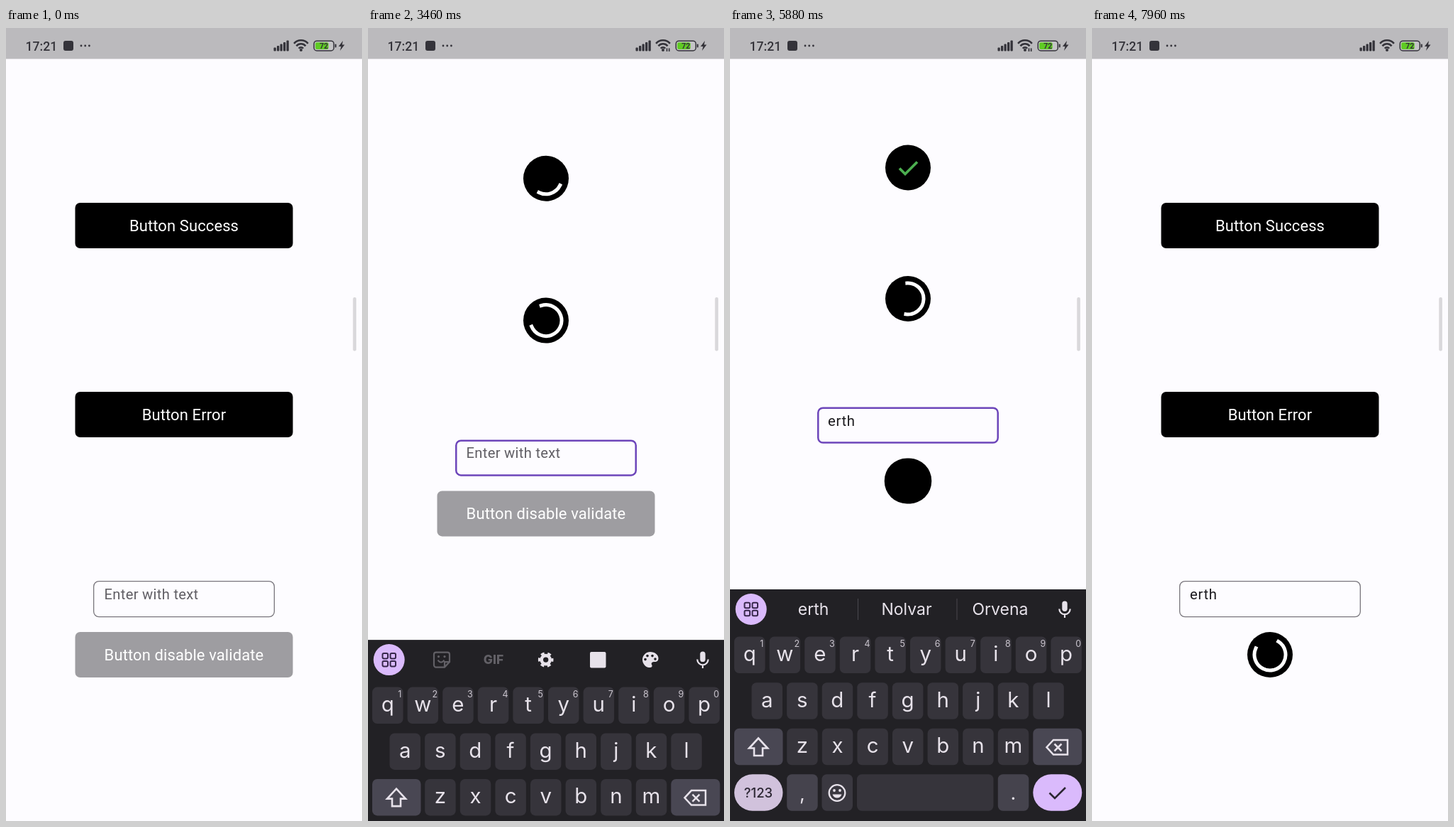
Recreate the animation shown at these times as an HTML page. Size 502x1116 px, loop 8 s.

```html
<!DOCTYPE html>
<html lang="en">
<head>
<meta charset="utf-8">
<title>Loading buttons</title>
<style>
  html, body { margin: 0; width: 100%; height: 100%; overflow: hidden; background: #fdfcff; }
  svg { display: block; width: 502px; height: 1116px; }
  text { font-family: Roboto, sans-serif; white-space: pre; }
  .key, .key text { font-family: Inter, Roboto, sans-serif; }
</style>
</head>
<body>
<svg id="stage" viewBox="0 0 502 1116"></svg>
<script>
const LOOP = 8000;
const STEP = 1000 / 24;
const KEYBOARD = 326;
const LIGHT = '#e7e2ea', DARK = '#222125', LILAC = '#dabafc', INK = '#34333a';
const stage = document.getElementById('stage');

function el(tag, attrs, parent = stage, content) {
  const node = document.createElementNS('http://www.w3.org/2000/svg', tag);
  set(node, attrs);
  if (content !== undefined) node.textContent = content;
  parent.appendChild(node);
  return node;
}
function set(node, attrs) {
  for (const name in attrs) node.setAttribute(name, attrs[name]);
}
const rect = (x, y, width, height, rx, fill, parent) =>
  el('rect', { x, y, width, height, rx, fill }, parent);
const circle = (cx, cy, r, fill, parent) => el('circle', { cx, cy, r, fill }, parent);
const line = (d, stroke, width, parent, cap = 'butt') =>
  el('path', { d, stroke, fill: 'none', 'stroke-width': width, 'stroke-linecap': cap }, parent);
const label = (x, y, size, fill, content, parent, anchor = 'middle', weight = 400) =>
  el('text', { x, y, fill, 'font-size': size, 'text-anchor': anchor, 'font-weight': weight }, parent, content);
const show = (node, on) => node.setAttribute('visibility', on ? 'inherit' : 'hidden');
const move = (node, y) => node.setAttribute('transform', `translate(0 ${y})`);

const clamp = x => Math.min(1, Math.max(0, x));
const progress = (t, start, length) => clamp((t - start) / length);
const easeOut = x => 1 - (1 - x) ** 3;
const easeInOut = x => x * x * (3 - 2 * x);

// cubic-bezier(.4, 0, .2, 1)
function standard(x) {
  x = clamp(x);
  let lo = 0, hi = 1;
  for (let i = 0; i < 24; i++) {
    const s = (lo + hi) / 2, r = 1 - s;
    if (1.2 * r * r * s + .6 * r * s * s + s ** 3 < x) lo = s; else hi = s;
  }
  return easeInOut(lo);
}

function arcPath(elapsed, radius) {
  const phase = elapsed / 1333 % 1;
  const head = standard(phase * 2) * 270;
  const tail = standard(phase * 2 - 1) * 270;
  const from = -90 + tail + phase * 90 + elapsed / 2222 * 360;
  const sweep = Math.max(head - tail, .1);
  const at = deg => {
    const a = deg * Math.PI / 180;
    return `${(radius * Math.cos(a)).toFixed(2)} ${(radius * Math.sin(a)).toFixed(2)}`;
  };
  return `M${at(from)}A${radius} ${radius} 0 ${sweep > 180 ? 1 : 0} 1 ${at(from + sweep)}`;
}

// Page: each button has a spinner start, a result time and a reopening time.
class Button {
  constructor(y, caption, times, mark) {
    Object.assign(this, { y, times });
    this.group = el('g', {});
    this.box = rect(0, -32, 0, 64, 7, '#000', this.group);
    this.caption = label(251, 7.7, 22, '#fff', caption, this.group);
    this.caption.setAttribute('letter-spacing', .1);
    const icon = el('g', { transform: 'translate(251 0)' }, this.group);
    this.arc = line('', '#fff', 5, icon, 'square');
    this.mark = mark && line(mark.d, mark.color, 3.7, icon);
  }
  draw(t, shift, color) {
    const { spin, done, open } = this.times;
    const shut = easeInOut(progress(t, spin - 250, 250)) - easeInOut(progress(t, open, 250));
    const width = 307 - 243 * shut;
    move(this.group, this.y - shift);
    set(this.box, { x: 251 - width / 2, width, rx: 7 + 25 * shut, fill: color });
    this.caption.setAttribute('opacity', clamp(1 - shut * 2.5));
    const spinning = t >= spin && t < done;
    show(this.arc, spinning);
    if (spinning) this.arc.setAttribute('d', arcPath(t - spin, 22));
    if (this.mark) show(this.mark, t >= done && t < open);
  }
}

const success = new Button(278, 'Button Success', { spin: 600, done: 5450, open: 6250 },
  { d: 'M-12 1L-4 9L13 -8', color: '#4caf50' });
const failure = new Button(544, 'Button Error', { spin: 1575, done: 6425, open: 7225 },
  { d: 'M-12.5 -11L12.5 14M12.5 -11L-12.5 14', color: '#f44336' });
const validate = new Button(882, 'Button disable validate', { spin: 5890, done: 1e5, open: 1e5 });

const field = el('g', {});
const frame = el('rect', { fill: 'none' }, field);
const hint = label(138.5, 804, 20.2, '#605e64', 'Enter with text', field, 'start');
hint.setAttribute('letter-spacing', .3);
const typed = label(138, 804, 20.4, '#1c1b1f', '', field, 'start');
typed.setAttribute('letter-spacing', .6);
const caret = rect(139, 780, 2.4, 31, 0, '#6750a4', field);

// The outline grows inwards when it gets thicker.
function outline(stroke, width) {
  set(frame, {
    x: 123 + width / 2, y: 778 + width / 2, width: 256 - width, height: 51.3 - width,
    rx: 8 - width / 2, stroke, 'stroke-width': width
  });
}

rect(489.3, 379, 4.6, 75.5, 2, '#d9d8db');

// Status bar
rect(0, 0, 502, 43.5, 0, '#bbbabd');
label(27.5, 31.5, 17.6, INK, '17:21', stage, 'start', 500);
rect(81, 18, 14, 14, 3, INK);
for (const x of [106, 111.7, 117.4]) circle(x, 25, 1.4, INK);
for (let i = 0; i < 5; i++) {
  const h = 5 + 2.5 * i;
  rect(377.5 + 4.5 * i, 32.5 - h, 3.3, h, 1, INK);
}
for (const r of [4.2, 8.6, 13]) {
  const d = r * .76;
  line(`M${416 - d} ${32 - r * .78}A${r} ${r} 0 0 1 ${416 + d} ${32 - r * .78}`, INK, 2.6);
}
circle(416, 31, 2, INK);
const traffic = line('M421.5 33V28.5M424.7 28.5V33', INK, 1.7);
el('rect', { x: 434.3, y: 18.2, width: 28, height: 13.8, rx: 4, fill: '#c5c4c7', stroke: INK, 'stroke-width': 1.5 });
rect(436.2, 20.2, 18.5, 9.8, 2, '#5fcb23');
label(448.2, 29, 10.5, INK, '72', stage, 'middle', 600);
rect(463.8, 22.5, 2, 5, 1, INK);
el('path', { d: 'M475 18L469 26H472.5L471 32L477.5 23.5H474Z', fill: INK });

// Keyboard
const board = el('g', { class: 'key' });
rect(0, 790, 502, 330, 0, DARK, board);
const tools = el('g', {}, board), words = el('g', {}, board);
circle(29.7, 818, 22, LILAC, board);
for (const x of [20.5, 31.5]) for (const y of [808.8, 819.8])
  el('rect', { x, y, width: 7.5, height: 7.5, rx: 1.8, fill: 'none', stroke: '#38284c', 'stroke-width': 2 }, board);
rect(468.3, 806.5, 7.4, 14.5, 3.7, LIGHT, board);
line('M464.3 817.5a7.7 7.7 0 0 0 15.4 0M472 825V830', LIGHT, 2.2, board);

const DIM = '#626066';
line('M96 807.5H112a3 3 0 0 1 3 3V821L108 828.5H96a3 3 0 0 1 -3 -3V810.5a3 3 0 0 1 3 -3ZM108 828V821H115M98.5 818.5q4.5 6 9 0', DIM, 2.2, tools);
circle(99.5, 813.5, 1.6, DIM, tools);
circle(108, 813.5, 1.6, DIM, tools);
label(177, 824, 17.5, DIM, 'GIF', tools, 'middle', 800);
el('circle', { cx: 250.7, cy: 818, r: 6, fill: 'none', stroke: LIGHT, 'stroke-width': 4.6 }, tools);
el('circle', { cx: 250.7, cy: 818, r: 9.2, fill: 'none', stroke: LIGHT, 'stroke-width': 3.2,
  'stroke-dasharray': '5 4.634', 'stroke-dashoffset': 2.5 }, tools);
rect(313, 807, 22.5, 22.5, 2, LIGHT, tools);
el('path', { d: 'M398 807a11 11 0 1 0 0 22c3 0 3 -3 2 -4c-1 -3 1 -4 4 -4c4 0 5.5 -2 5.5 -5c0 -5 -5 -9 -11.5 -9Z', fill: LIGHT }, tools);
for (const [x, y] of [[391, 817.5], [394, 812.5], [401, 812.5], [405, 817]]) circle(x, y, 1.8, DARK, tools);

const picks = [117.5, 249, 381].map(x => label(x, 826, 23, LIGHT, '', words));
for (const x of [180, 319.5]) rect(x, 803, 1, 30, 0, '#4a484f', words);

const keys = {};
const KEY = '#36343b', SIDE = '#494753';
const cap = (x, y, w, fill, r = 7) => rect(x, y, w, 51.5, r, fill, board);
function row(letters, x, y, digits) {
  [...letters].forEach((letter, i) => {
    const left = x + 49.6 * i;
    keys[letter] = cap(left, y, 43.5, KEY);
    label(left + 21.7, y + 34.5, 29.5, LIGHT, letter, board);
    if (digits) label(left + 38.7, y + 14.5, 12.5, '#cbc6cf', digits[i], board);
  });
}
row('qwertyuiop', 6, 856.5, '1234567890');
row('asdfghjkl', 30.5, 921.3);
row('zxcvbnm', 80.2, 985.8);
cap(6, 985.8, 68.5, SIDE);
cap(427.3, 985.8, 69, SIDE);
line('M40 999.5L53 1013.5H46V1024H34V1013.5H27Z', LIGHT, 2.6, board);
line('M456 1002H476V1022.5H456L446.5 1012.2ZM457.5 1007.5L467.5 1017.5M467.5 1007.5L457.5 1017.5', LIGHT, 2.5, board);
cap(6, 1050.3, 68.5, '#d1c2dc', 25.7);
label(40, 1083, 18.5, '#2c2733', '?123', board, 'middle', 500);
cap(80.2, 1050.3, 43.5, '#45434d');
label(102, 1087, 27, LIGHT, ',', board);
cap(129.5, 1050.3, 43.5, '#3a3840');
el('circle', { cx: 151, cy: 1076.5, r: 11.3, fill: 'none', stroke: LIGHT, 'stroke-width': 2.3 }, board);
circle(147, 1073, 1.9, LIGHT, board);
circle(155, 1073, 1.9, LIGHT, board);
el('path', { d: 'M144.5 1078.5H157.5q-1.8 5 -6.5 5t-6.5 -5Z', fill: LIGHT }, board);
cap(179, 1050.3, 192.5, KEY);
cap(377.8, 1050.3, 43.5, '#45434d');
label(399.5, 1086, 27, LIGHT, '.', board);
cap(427.3, 1050.3, 69, LILAC, 25.7);
line('M450.5 1076.5L458 1084L473 1069', '#2c2733', 2.6, board);

const GUESSES = ['erth', 'Nolvar', 'Orvena'];
const TYPING = [
  { at: 4250, key: 'e', picks: ['e', 'em', 'ele'] },
  { at: 4580, key: 'r', picks: ['er', 'era', 'eram'] },
  { at: 4830, key: 't', picks: GUESSES },
  { at: 5030, key: 'h', picks: GUESSES }
];
const FOCUS = 3200, RISE = 3313, FALL = 7400, SLIDE = 340;

// Share of the keyboard that is up
const lift = t => easeOut(progress(t, RISE, SLIDE)) - easeOut(progress(t, FALL, SLIDE));

function draw(t) {
  const inset = KEYBOARD * lift(t);
  const focused = t >= FOCUS && t < FALL;
  const strokes = TYPING.filter(s => t >= s.at);
  const last = strokes[strokes.length - 1];

  success.draw(t, inset / 4, '#000');
  failure.draw(t, inset / 2, '#000');
  validate.draw(t, inset * 3 / 4, strokes.length > 3 ? '#000' : '#9e9da1');

  move(field, -inset * 3 / 4);
  outline(focused ? '#6d46ba' : '#79767d', focused ? 2.5 : 1.3);
  typed.textContent = strokes.map(s => s.key).join('');
  show(hint, !last);
  const blinkFrom = last ? last.at : 3700;
  show(caret, focused && t >= blinkFrom && (t - blinkFrom) % 1000 < 500);
  caret.setAttribute('x', last ? 139 + typed.getComputedTextLength() : 138.5);

  show(traffic, t > 3000 && t < 7300);
  move(board, KEYBOARD * (1 - lift(t - 10)));
  show(tools, !last);
  show(words, last);
  if (last) picks.forEach((node, i) => node.textContent = last.picks[i]);
  for (const s of TYPING)
    keys[s.key].setAttribute('fill', t >= s.at - 120 && t < s.at - 35 ? '#56535f' : KEY);
}

function tick(now) {
  let t = Math.floor((now % LOOP + 5) / STEP) * STEP;
  if (t > 2540 && t < 2785) t = 2540;
  draw(t % LOOP);
  requestAnimationFrame(tick);
}
draw(0);
requestAnimationFrame(tick);
</script>
</body>
</html>
```
